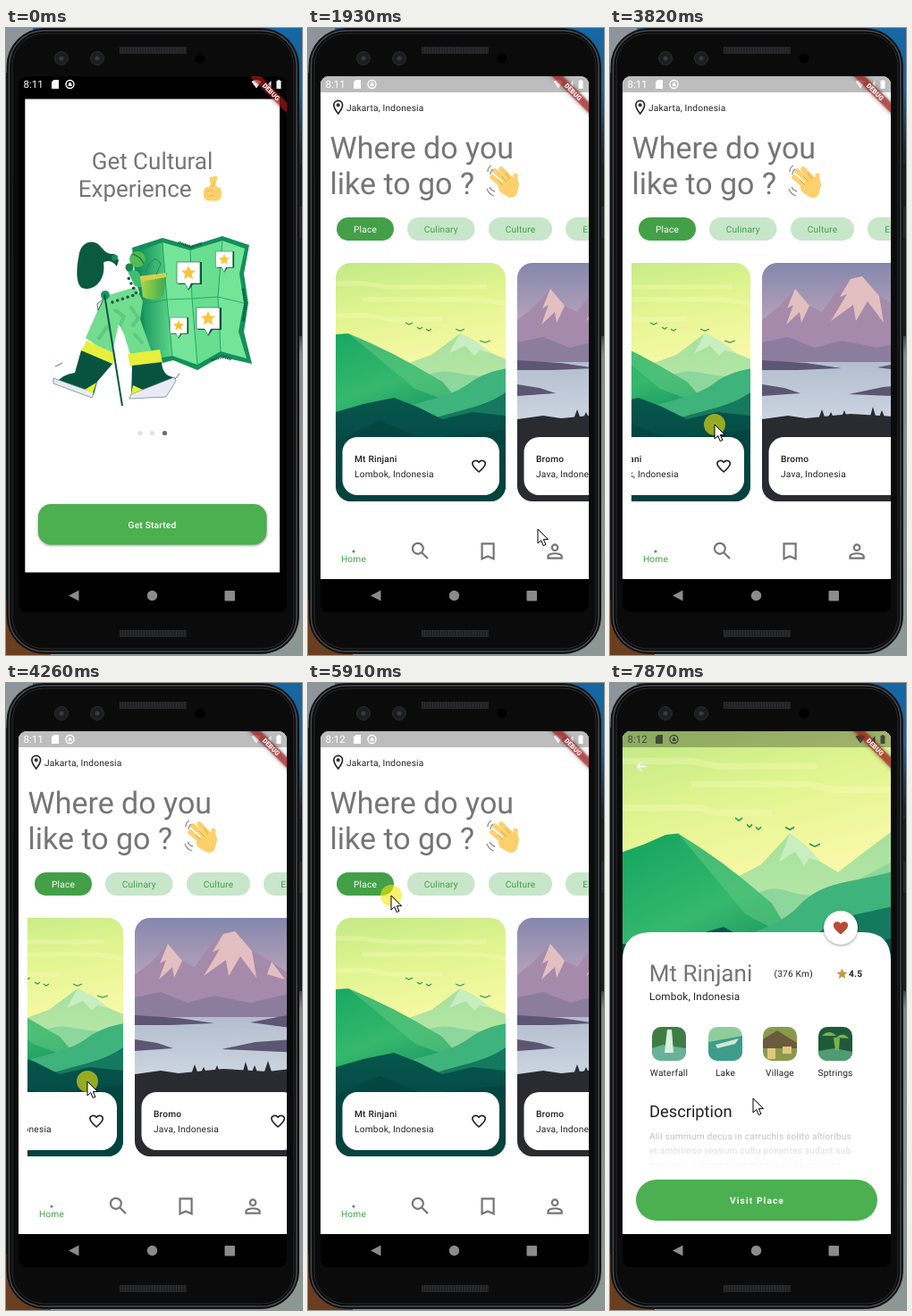
An HTML page that plays this animation: 331 by 702 pixels, repeating every 7990 ms.

```html
<!DOCTYPE html>
<html lang="en">
<head>
<meta charset="utf-8">
<title>Travel app</title>
<style>
html, body { margin: 0; height: 100%; overflow: hidden; background: #111; }
svg { display: block; width: 100vw; height: 100vh; }
text { font: 10.2px Roboto, sans-serif; letter-spacing: .18px; fill: #212121; text-rendering: geometricPrecision; white-space: pre; }
.mid { text-anchor: middle; }
.med { font-weight: 500; }
.h1 { font-size: 26px; letter-spacing: 0; fill: #757575; }
.big { font-size: 34px; letter-spacing: 0; fill: #757575; }
.line { fill: none; stroke-width: 2; }
.lift { filter: drop-shadow(0 1px 1.5px #0006); }
.glow { filter: drop-shadow(0 0 2.5px #0009); }
.hand { stroke: #fcd06b; stroke-linecap: round; fill: none; }
</style>
</head>
<body>
<svg viewBox="0 0 331 702" preserveAspectRatio="none">
<defs>
  <linearGradient id="desk" x2="0" y2="1">
    <stop stop-color="#1667a3"/><stop offset=".1" stop-color="#17619a"/><stop offset=".2" stop-color="#20262a"/>
    <stop offset=".48" stop-color="#2a302f"/><stop offset=".52" stop-color="#7d8a86"/><stop offset="1" stop-color="#8b9893"/>
  </linearGradient>
  <linearGradient id="sky" x2=".2" y2="1">
    <stop stop-color="#bce884"/><stop offset=".25" stop-color="#e0f48f"/><stop offset=".5" stop-color="#f8f9a6"/><stop offset="1" stop-color="#d5f3c0"/>
  </linearGradient>
  <linearGradient id="far" x2="0" y2="1"><stop stop-color="#a3e09b"/><stop offset="1" stop-color="#d2f0b6"/></linearGradient>
  <linearGradient id="near" x2=".5" y2="1"><stop stop-color="#12a45f"/><stop offset=".55" stop-color="#35b86d"/><stop offset="1" stop-color="#0c8a5c"/></linearGradient>
  <linearGradient id="deep" x2="0" y2="1"><stop stop-color="#06564c"/><stop offset="1" stop-color="#033b3c"/></linearGradient>
  <linearGradient id="dusk" x2="0" y2="1"><stop stop-color="#8487ad"/><stop offset=".3" stop-color="#c2a9bd"/><stop offset="1" stop-color="#e0c3c6"/></linearGradient>
  <linearGradient id="lake" x2="0" y2="1"><stop stop-color="#b3bdcf"/><stop offset="1" stop-color="#d0d9e2"/></linearGradient>
  <linearGradient id="fade" x2="0" y2="1"><stop stop-color="#fff" stop-opacity="0"/><stop offset=".85" stop-color="#fff"/></linearGradient>
  <linearGradient id="pail"><stop stop-color="#a9d84a"/><stop offset="1" stop-color="#35a94f"/></linearGradient>
  <linearGradient id="fold"><stop stop-color="#12905a"/><stop offset="1" stop-color="#5fd88a"/></linearGradient>
  <clipPath id="screen"><rect x="14" y="54" width="300" height="600" rx="9"/></clipPath>
  <clipPath id="list"><path d="M24 194H314V540H24z"/></clipPath>
  <clipPath id="card"><rect x="31" y="263" width="190" height="267" rx="17"/></clipPath>
  <clipPath id="thumb"><rect width="38" height="38" rx="10"/></clipPath>

  <path id="star" d="M0-6 1.8-2 6-1.6 2.8 1.2 3.8 5.4 0 3.2-3.8 5.4-2.8 1.2-6-1.6-1.8-2z"/>
  <path id="heart" d="M12 20C5 14 3 11.5 3 8.5 3 3.5 9.5 3 12 6.5 14.5 3 21 3.5 21 8.5 21 11.5 19 14 12 20z"/>
  <g id="pin">
    <path d="M-11-12H15V13H5L0 20-2 13H-11z" fill="#0b4f3a"/>
    <path d="M-13-12H13V12H3L0 19-4 12H-13z" fill="#fff" stroke="#2a6b50" stroke-width=".7"/>
    <use href="#star" transform="scale(1.35)" fill="#f9c53c"/>
  </g>
  <g id="valley">
    <path d="M-20 260H300V540H-20z" fill="url(#sky)"/>
    <path d="M-20 286H60l30 4H200M60 304H190l30 4H300M-20 322H70l20 4H150" fill="none" stroke="#fcfcc0" stroke-width="5" opacity=".3"/>
    <path d="M70 402 110 376 138 366 170 342 186 350 205 364 224 372 250 358 283 341 300 338V480H70z" fill="url(#far)"/>
    <path d="M170 342 186 350 205 364 192 361 186 367 176 356 158 364z" fill="#c9eec0"/>
    <path d="M80 420C120 392 140 382 160 385S200 396 240 380L300 358V480H80z" fill="#8dd79c"/>
    <path d="M-20 357 8 350 31 343 45 342 70 353 95 365 119 378 150 396 174 424V480H-20z" fill="url(#near)"/>
    <path d="M45 342 70 353 95 365 119 378 150 396 174 424 120 404 84 374z" fill="#5cc77f" opacity=".6"/>
    <path d="M66 445C100 418 150 420 180 398S240 382 300 368V500H66z" fill="#3fb37c"/>
    <path d="M110 450C150 428 190 430 221 408L300 396V500H110z" fill="#15795f"/>
    <path d="M-20 427 31 430 62 421 96 414 122 424 150 438 184 430 221 434 300 420V540H-20z" fill="url(#deep)"/>
    <path d="M31 462 80 440 130 460 221 450V540H31z" fill="#03443f" opacity=".8"/>
    <path d="m109 330 4 2 4-2m5 5 3 2 3-2m4 2 3 2 3-2m27 0 5 2 5-2m17 13 6 2 6-2" fill="none" stroke="#2f9a62" stroke-width="1.3"/>
  </g>
  <g id="bromo">
    <path d="M31 263H221V530H31z" fill="url(#dusk)"/>
    <path d="M31 327 50 312 68 292 84 311 98 318 119 288 130 281 143 278 162 300 184 312 221 338V390H31z" fill="#a58aab"/>
    <path d="m68 292-9 22 7-4-8 22 15-14 2 12 9-19zM143 278l-13 3-12 20 8-3-18 30 25-18 3 18 13-22 18 24-5-30zM184 312l-5 14 20 6z" fill="#e4bfc1"/>
    <path d="M31 352 60 346 90 358 120 350 160 358 221 344V382H31z" fill="#8c7d9e"/>
    <path d="M31 374H221V450H31z" fill="url(#lake)"/>
    <path d="M31 372 80 375 120 381 70 383H31zM160 380 221 368V388zM31 399 56 403 74 409 31 412zM128 410 166 402 221 398V414z" fill="#5d5672"/>
    <path d="M31 438 60 434 80 437 130 432 180 435 221 430V530H31z" fill="#292b30"/>
    <path d="M94 438l4-11 4 11zm10 0 4-8 4 8zm15 0 4-10 4 10zm32 0 4-14 4 14zm10 0 4-10 4 10zm14 0 5-15 5 15z" fill="#292b30"/>
  </g>
</defs>

<path d="M0 0H331V702H0z" fill="url(#desk)"/>
<path d="M0 0H30V50H0z" fill="#8d959b"/><path d="M0 50H30V650H0z" fill="#15191c"/><path d="M0 640H50V702H0z" fill="#6a3f20"/>
<path d="M326 152h5v48h-5zM326 235h5v110h-5z" fill="#1a1c1e"/>
<rect x="1" y=".5" width="326.500" height="700" rx="42" fill="#08090a" stroke="#1b1d1f"/>
<rect x="3.500" y="3" width="321.500" height="695" rx="39" fill="none" stroke="#4b4e50" stroke-width="1.500"/>
<rect x="7" y="6" width="315" height="689" rx="36" fill="#0b0b0c" stroke="#2a2c2e"/>
<path d="M127 25h75M127 678h75" stroke="#202123" stroke-width="8"/>
<path d="M127 25h75M127 678h75" stroke="#2b2c2e" stroke-width="8" stroke-dasharray="1 2"/>
<g fill="#1c1d1f" stroke="#2b2c2f"><circle cx="62" cy="34" r="7.500"/><circle cx="102" cy="34" r="7.500"/></g>
<g fill="#383a3e"><circle cx="62" cy="34" r="2.500"/><circle cx="102" cy="34" r="2.500"/></g>
<circle cx="217" cy="34" r="5.500" fill="#000"/>
<rect x="14" y="54" width="300" height="600" rx="9"/>

<g clip-path="url(#screen)">
  <g id="intro">
    <path d="M21.300 79.500H306V609.600H21.300z" fill="#fff"/>
    <text class="h1 mid" x="163.500" y="158">Get Cultural</text>
    <text class="h1" x="80.800" y="188.600">Experience</text>
    <g class="hand" stroke-width="5"><path d="m229 181 5-13m-1 13-3-12"/><path d="M227 183.500h8v4h-8z" stroke-width="12" stroke-linejoin="round"/></g>
    <path d="m231 178 2-6M224 183q6-3 9 1m-8 5 8-2" fill="none" stroke="#e8b04c" stroke-width=".8"/>
    <g id="trip">
      <path d="M141 246 175 235 207 244 242 233 272 243 266 275 271 308 266 340 275 376 240 368 214 383 187 372 155 380z" fill="#12905a"/>
      <path d="M148 250 175 240 180 304 186 367 158 372z" fill="url(#fold)"/>
      <path d="M175 240 206 249 208 303 214 377 186 367 180 304z" fill="#74e598"/>
      <path d="M206 249 242 238 237 301 240 362 214 377 208 303z" fill="#68de90"/>
      <path d="M242 238 267 247 261 275 266 308 260 340 269 370 240 362 237 301z" fill="#74e598"/>
      <path d="m150 310 30-6 28-1 29-2 29 7M175 240l5 64 6 63M206 249l2 54 6 74M242 238l-5 63 3 61" fill="none" stroke="#1b9a60" stroke-width=".8"/>
      <path d="m193 240 14 5 12-4m11 131 12-4 10 3M265 292l3 17-3 20" fill="none" stroke="#0b4f3a" stroke-width="3" stroke-dasharray="1 .8"/>
      <use href="#pin" x="204" y="274"/>
      <use href="#pin" x="226" y="325"/>
      <use href="#pin" transform="translate(244 259)scale(.74)"/>
      <use href="#pin" transform="translate(193 333)scale(.74)"/>
      <path d="M127 262q16 8 22 35l-25 9-9-10z" fill="#fff"/>
      <path d="M82 252C85 239 97 237 103 242 109 247 111 254 121 253L126 260 124 267C119 260 112 260 109 263 112 280 100 296 85 291 77 286 79 266 82 252z" fill="#0a5a40"/>
      <circle cx="121.500" cy="257" r="3.500" fill="#139257"/>
      <path d="m118 298 27-8 8 16-3 20 14 40-24 3-8-26-6-12-8 36-29-20 18-41z" fill="#72dc8f"/>
      <path d="m122 316 10 7-4 9m12-19 8 12-6 8m-29 2-9 12m40-4 8 9" fill="none" stroke="#5cca80" stroke-width="4" stroke-linecap="round"/>
      <path d="m119 307 27-9-11-22" fill="none" stroke="#0a5a40" stroke-width="3.500" stroke-dasharray="0 6" stroke-linecap="round"/>
      <path d="m134 268 14 5 9 18-13-2z" fill="#3fbd70"/>
      <path d="M150 278 180 274 176 299Q164 308 153 301z" fill="url(#pail)"/>
      <path d="m150 278 29-4v5l-28 5z" fill="#d5cf4a"/>
      <path d="M156 274q9-24 17-10l-5 12" fill="none" stroke="#278453"/>
      <circle cx="147" cy="259" r="9" fill="#54b956"/><path d="M141 253q9 2 13 11" fill="none" stroke="#277e45" stroke-width="1.500"/>
      <circle cx="138" cy="268" r="4.500" fill="#128653"/>
      <path d="m90 350 33 15-4 12-35-15z" fill="#e6ef3d"/>
      <path d="M84 361 119 376 102 396 98 411 56 398Q62 388 77 386z" fill="#07533f"/>
      <path d="m53 392 45 16-2 6-43-16z" fill="#e8ebf4" stroke="#617b79" stroke-width=".7"/>
      <path d="m136 365 36-5 3 15-36 4z" fill="#e6ef3d"/>
      <path d="M141 378 174 374Q175 390 188 391L186 397 140 412z" fill="#07533f"/>
      <path d="m188 391-48 19-2 5 41-2 11-18z" fill="#e8ebf4" stroke="#617b79" stroke-width=".7"/>
      <path d="m101 397-4 12-9-4zm39 13 2-10 11 5z" fill="#e6ef3d"/>
      <circle cx="111" cy="299" r="5" fill="#16985d"/><path d="m110 298 20 125" stroke="#0a5a40" stroke-width="2"/>
      <path d="m110 302-7 14-1-7 7-6M55 379l8-4m126 18 5-6" fill="none" stroke="#0a5a40" stroke-width=".8"/>
    </g>
    <g fill="#e0e0e0"><circle cx="150" cy="453.500" r="2.600"/><circle cx="163.500" cy="453.500" r="2.600"/></g>
    <circle cx="177.500" cy="453.500" r="2.600" fill="#6b6b6b"/>
    <rect class="lift" x="36" y="533" width="255.500" height="45.500" rx="14.500" fill="#4caf50"/>
    <text class="mid med" x="163.500" y="559.500" style="fill:#fff">Get Started</text>
  </g>

  <g id="home">
    <path d="M14 54H314V617H14z" fill="#fff"/><path d="M14 54H314V72H14z" fill="#bdbdbd"/>
    <g class="line" stroke="#212121" transform="translate(24 79)scale(.81)"><path d="M12 21C8 16 6 12 6 9a6 6 0 0 1 12 0c0 3-2 7-6 12z"/><circle cx="12" cy="9" r="1.500"/></g>
    <text x="43" y="92.500">Jakarta, Indonesia</text>
    <text class="big" x="24.500" y="146">Where do you</text>
    <text class="big" x="24.500" y="186">like to go ?</text>
    <g class="hand" stroke-width="5.500"><path d="m221 180-15-13m20 8-17-15m21 12-14-14m16 20-9-13"/><path d="m232 180 0-15" stroke-width="5"/><path d="m220 179 7 4 2-8z" stroke-width="14" stroke-linejoin="round"/></g>
    <path d="m212 170 6 6m-2-10 6 6m-1-10 5 7" stroke="#dfa747"/>
    <path d="M201 161q0-5 4-7m-1 10q0-4 3-6m-7 22q2 6 8 8m-5-10q2 4 6 5" fill="none" stroke="#8f8f8f" stroke-width="1.300"/>
    <g clip-path="url(#list)"><g id="chips"></g><g id="cards"></g></g>
    <circle cx="51" cy="586" r="1.600" fill="#43a047"/>
    <text class="mid" x="51" y="598" style="fill:#43a047">Home</text>
    <g class="line" stroke="#757575">
      <g transform="translate(112.500 572.500)scale(1.090)"><circle cx="9.500" cy="9.500" r="5.500"/><path d="m13.700 13.700 6 6"/></g>
      <path transform="translate(188 573)scale(1.090)" d="M6 4h12v15.500l-6-2.600-6 2.600z"/>
      <g transform="translate(263 573)scale(1.090)"><circle cx="12" cy="8" r="3"/><path d="M5 19v-2c0-2 4.500-3 7-3s7 1 7 3v2z"/></g>
    </g>
  </g>

  <g id="place">
    <path d="M14 54H314V617H14z" fill="#fff"/>
    <use href="#valley" transform="translate(31 54)scale(1 1.450)translate(0 -263)"/>
    <path d="M14 54H314V72H14z" fill-opacity=".27"/>
    <path d="M41 93.500H30.500m5-5-5 5 5 5" fill="none" stroke="#fff" stroke-width="1.500"/>
    <path d="M14 617V311Q14 279 46 279H282Q314 279 314 311V617z" fill="#fff"/>
    <circle class="lift" cx="258" cy="274" r="19" fill="#fff"/>
    <use href="#heart" transform="translate(247.200 263.500)scale(.9)" fill="#b94a35"/>
    <text class="h1" x="43.800" y="333.500">Mt Rinjani</text>
    <text x="183.500" y="328.700">(376 Km)</text>
    <use href="#star" x="259.500" y="325.500" fill="#c09a48"/>
    <text x="267" y="328.700" style="font-weight:700">4.5</text>
    <text x="44" y="355" style="font-size:11.700px">Lombok, Indonesia</text>
    <g id="thumbs"></g>
    <text x="44" y="485.500" style="font-size:18.300px;letter-spacing:0">Description</text>
    <g id="prose"></g>
    <path d="M30 500H300V552H30z" fill="url(#fade)"/>
    <rect x="29" y="556" width="270" height="46" rx="23" fill="#4caf50"/>
    <text class="mid" x="164.500" y="582.700" style="fill:#fff;font-weight:700;letter-spacing:1.100px">Visit Place</text>
  </g>

  <path d="M14 617H314V654H14z"/>
  <g fill="#8b8b8b"><path d="m70 635.500 11.500-6v12z"/><circle cx="163.500" cy="635.500" r="5.700"/><rect x="244.500" y="630" width="11.500" height="11.500" rx="1"/></g>
  <g id="status">
    <text id="clock" x="19.500" y="67.300" style="fill:inherit;font-size:11.500px;letter-spacing:0">8:11</text>
    <path d="M53.500 58H59v10h-8V60.500z"/>
    <circle id="ring" cx="71.500" cy="63" r="4.500" fill="none" stroke-width="1.400"/><path d="m69.500 65 1-4h2l1.500 4z"/>
    <path d="M274.500 60q5.500-4 11 0L280 67.500zM289 67.500 296.500 59v8.500zM303 59h1V58h2v1h1.500v9h-5v-9z"/>
  </g>
  <g transform="translate(314 54)rotate(45)">
    <path class="glow" d="M-40 20.400h80v8.800h-80z" fill="#b71c1c" fill-opacity=".63"/>
    <text class="mid" y="27.400" style="fill:#fff;font-size:7.400px;font-weight:900;letter-spacing:0">DEBUG</text>
  </g>
</g>
<g id="mouse">
  <circle id="press" r="12" fill="#f7e80a" fill-opacity=".6"/>
  <path d="M0 0V16L3.700 12.600 6.200 18.600 8.900 17.400 6.400 11.600H11.500z" fill="#fff" stroke="#000"/>
</g>
</svg>
<script>
const $ = id => document.getElementById(id);

$('chips').innerHTML = [['Place', 32, 64], ['Culinary', 111, 75.5], ['Culture', 202, 71], ['Experience', 288, 90]]
  .map(([name, x, w], i) => `<rect x="${x}" y="212" width="${w}" height="26" rx="13" fill="${i ? '#c8e6c9' : '#43a047'}"/>
    <text class="mid" x="${x + w / 2}" y="228.700" style="fill:${i ? '#43a047' : '#fff'}">${name}</text>`).join('');

$('cards').innerHTML = [['Mt Rinjani', 'Lombok', 'valley'], ['Bromo', 'Java', 'bromo']]
  .map(([name, isle, art], i) => `<g transform="translate(${i * 203})">
    <g clip-path="url(#card)"><use href="#${art}"/></g>
    <rect x="38.500" y="458" width="175.500" height="65" rx="17" fill="#fff"/>
    <text class="med" x="52" y="486">${name}</text><text x="52" y="502.500">${isle}, Indonesia</text>
    <use href="#heart" class="line" stroke="#212121" transform="translate(181.500 481)scale(.8)"/></g>`).join('');

// label, left, backdrop, main shape, its colour, accent shape, its colour
$('thumbs').innerHTML = [
  ['Waterfall', 47, '#3f7d45', 'M0 24 12 20 38 24V38H0z', '#69b29a', 'M17 3h5l2 26H14z', '#d9f3df'],
  ['Lake', 110, '#8fce9b', 'M0 17 38 10V38H0z', '#3e9c8b', 'M8 20 34 13 30 19 10 24z', '#d4e8d0'],
  ['Village', 171, '#8a9a4d', 'M0 14 16 4 38 18V24H0z', '#6b5a3c', 'M5 24h9v12H5zM22 22h10v8H22z', '#e0c77a'],
  ['Sptrings', 233, '#1f5a38', 'M0 27 18 24 38 28V38H0z', '#4f9b72', 'M17 12 19 26H23L24 12zM4 10q8-8 16 0zM20 12q8-7 14 1z', '#7fb04f']
].map(([name, x, back, main, c1, accent, c2]) => `<g transform="translate(${x} 385)">
  <g clip-path="url(#thumb)"><path d="M0 0H38V38H0z" fill="${back}"/><path d="${main}" fill="${c1}"/><path d="${accent}" fill="${c2}"/></g>
  <text class="mid" x="19" y="54.700">${name}</text></g>`).join('');

$('prose').innerHTML = ['Alii summum decus in carruchis solito altioribus',
  'et ambitioso vestium cultu ponentes sudant sub', 'ponderibus lacernarum quas in collis insertas']
  .map((line, i) => `<text x="44" y="${511 + i * 16}" style="fill:#b4b4b4">${line}</text>`).join('');

// The screen refreshes in bursts: start, end, number of steps
const steps = [[310, 630, 4], [1400, 1500, 2], [1830, 1930, 2], [2150, 2150, 1], [2820, 3600, 8], [3700, 4040, 4],
  [4260, 5040, 8], [5160, 5580, 5], [5810, 6130, 4], [6350, 6700, 4], [7440, 7560, 2], [7770, 7870, 2]]
  .flatMap(([a, b, n]) => Array.from({length: n}, (_, i) => a + Math.floor((b - a) * i / Math.max(1, n - 1) / 20) * 20));

// Keys are [time, ...values]
const path = [[310, 310, 564], [630, 257, 561], [2819, 257, 561], [2820, 241, 536], [3200, 181, 445], [3800, 117, 444],
  [4040, 61, 446], [4260, 91, 446], [4580, 181, 440], [4700, 120, 262], [4800, 91, 225], [4920, 180, 180],
  [5040, 230, 208], [5260, 160, 210], [5580, 230, 216], [5810, 150, 228], [5910, 93, 238], [6240, 93, 238],
  [6460, 150, 290], [6570, 178, 360], [6690, 152, 415], [7660, 152, 415], [7870, 160, 465]];
const cardScroll = [[3200, 0], [3800, -64], [4040, -120], [4260, -90], [4580, 0]];
const chipScroll = [[5040, 0], [5260, -70], [5580, 0]];
const homeFade = [[1730, 0], [1930, 1]];
const placeFade = [[7320, 0], [7560, 1]];
const presses = [[1400, 1500], [3200, 4580], [5140, 5580], [5900, 6000]];

function at(keys, t) {
  const i = keys.findIndex(k => k[0] > t);
  if (i === 0) return keys[0].slice(1);
  if (i < 0) return keys[keys.length - 1].slice(1);
  const a = keys[i - 1], b = keys[i], p = (t - a[0]) / (b[0] - a[0]);
  return a.slice(1).map((v, j) => v + (b[j + 1] - v) * p);
}

function draw(now) {
  const clock = now % 7990;
  const t = steps.reduce((last, s) => s <= clock ? s : last, 0);
  const place = at(placeFade, t)[0];
  $('home').style.opacity = at(homeFade, t)[0];
  $('place').style.opacity = place;
  $('cards').setAttribute('transform', `translate(${at(cardScroll, t)})`);
  $('chips').setAttribute('transform', `translate(${at(chipScroll, t)})`);
  $('mouse').setAttribute('transform', `translate(${at(path, t)})`);
  $('mouse').style.display = t < 310 ? 'none' : '';
  $('press').style.display = presses.some(([a, b]) => t >= a && t < b) ? '' : 'none';
  $('clock').textContent = t < 5810 ? '8:11' : '8:12';
  const ink = place >= .5 ? '#3f4a35' : '#fff';
  $('status').setAttribute('fill', ink);
  $('ring').setAttribute('stroke', ink);
  requestAnimationFrame(draw);
}
requestAnimationFrame(draw);
</script>
</body>
</html>
```
